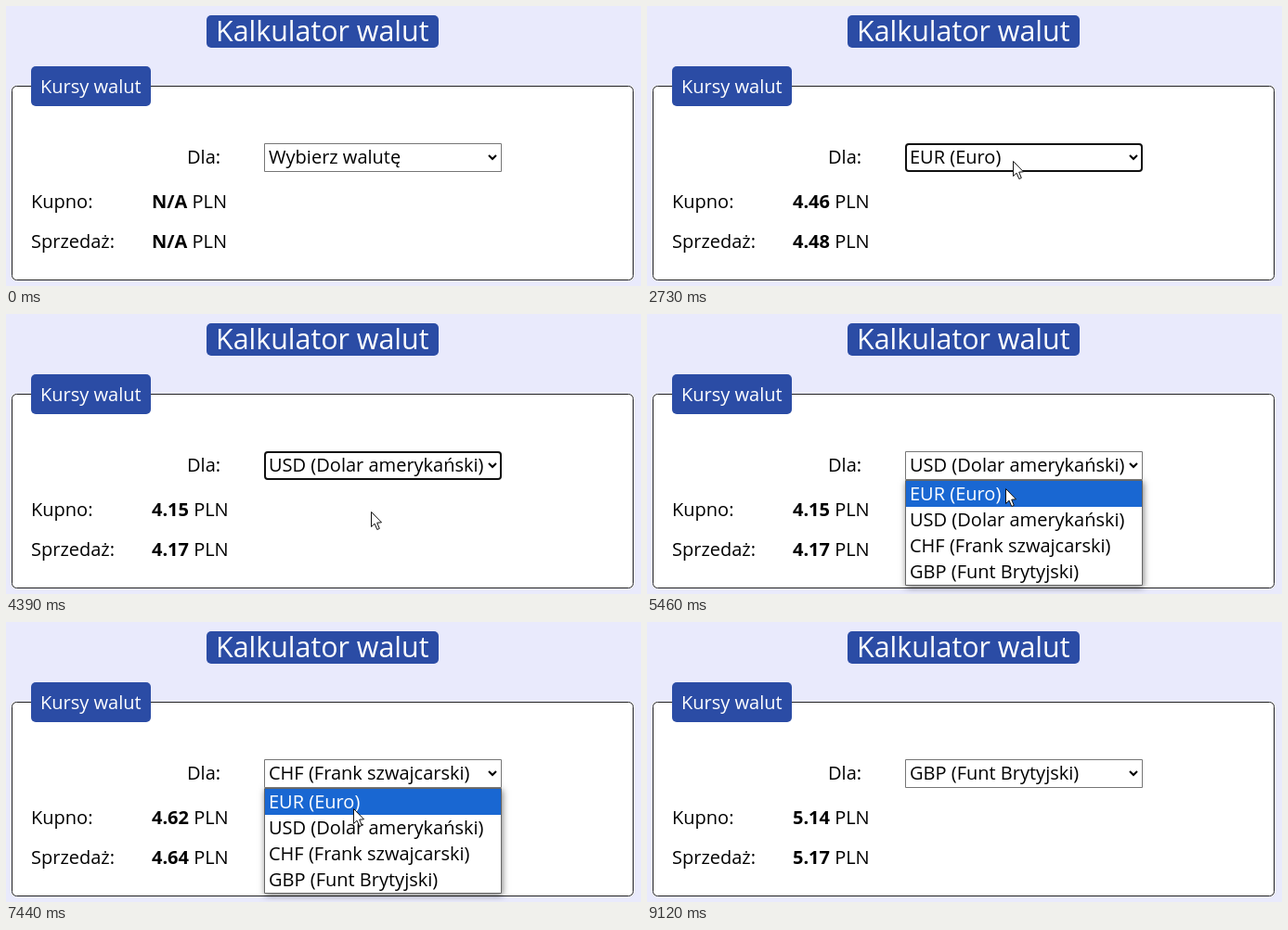
An HTML page with a canvas for the animation above (9.18 s loop, 684 px wide and 302 px high).

```html
<!DOCTYPE html>
<html lang="pl">
<head>
<meta charset="utf-8">
<title>Kalkulator walut</title>
<style>
  html, body { margin: 0; width: 100%; height: 100%; overflow: hidden; background: #e9eafc; }
  canvas { display: block; width: 684px; height: 302px; }
</style>
</head>
<body>
<canvas id="stage" width="684" height="302"></canvas>
<script>
const ctx = document.getElementById('stage').getContext('2d');
const LOOP = 9180;
const FAMILY = '"Open Sans", "Noto Sans", sans-serif';
const BLUE = '#2b4ca5';

const options = [
  { label: 'EUR (Euro)', buy: '4.46', sell: '4.48' },
  { label: 'USD (Dolar amerykański)', buy: '4.15', sell: '4.17' },
  { label: 'CHF (Frank szwajcarski)', buy: '4.62', sell: '4.64' },
  { label: 'GBP (Funt Brytyjski)', buy: '5.14', sell: '5.17' }
];
const placeholder = { label: 'Wybierz walutę', buy: 'N/A', sell: 'N/A' };

// Each round: the list opens on a click, then a second click picks the option.
const rounds = [
  { open: 930, openEnd: 1000, pick: 2000, close: 2060 },
  { open: 3060, openEnd: 3120, pick: 4130, close: 4190 },
  { open: 5120, openEnd: 5250, pick: 6190, close: 6250 },
  { open: 7110, openEnd: 7180, pick: 8240, close: 8450 }
];

const cubic = p => p < 0.5 ? 4 * p ** 3 : 1 - 4 * (1 - p) ** 3;
const smooth = p => p * p * (3 - 2 * p);
const easeOut = p => 1 - (1 - p) ** 1.6;
const easeIn = p => p ** 1.5;

// The pointer moves in discrete steps, as in a screen recording.
const entry = [455, 264];
const moves = [
  { from: 190, to: 720, steps: 9, end: [406, 158], ease: easeOut },
  { from: 1200, to: 1460, steps: 5, end: [398, 190], ease: smooth },
  { from: 2590, to: 2730, steps: 3, end: [394, 167], ease: smooth },
  { from: 3260, to: 3530, steps: 5, end: [393, 214], ease: smooth },
  { from: 4390, to: 4720, steps: 6, end: [387, 168], ease: cubic },
  { from: 5390, to: 5720, steps: 6, end: [385, 244], ease: smooth },
  { from: 6450, to: 6850, steps: 6, end: [370, 166], ease: smooth },
  { from: 7380, to: 7910, steps: 9, end: [382, 273], ease: easeOut },
  { from: 8590, to: 8720, steps: 3, end: [582, 287], ease: easeIn }
];
const POINTER_ON = 190, POINTER_OFF = 8790, BLUR_AT = 9120;

function pointerAt(t) {
  let pos = entry;
  for (const m of moves) {
    if (t < m.from) break;
    const pace = (m.to - m.from) / (m.steps - 1);
    const step = Math.min(m.steps, Math.floor((t - m.from) / pace + 0.08) + 1);
    const k = m.ease(step / m.steps);
    pos = pos.map((v, i) => Math.round(v + (m.end[i] - v) * k));
  }
  return pos;
}

function stateAt(t) {
  const s = { chosen: -1, open: false, click: false, focus: false };
  rounds.forEach((r, i) => {
    if (t >= r.close) s.chosen = i;
    if (t >= r.open && t < r.close) s.open = true;
    if ((t >= r.open && t < r.openEnd) || (t >= r.pick && t < r.close)) s.click = true;
  });
  s.focus = s.chosen >= 0 && !s.open && t < BLUR_AT;
  return s;
}

function text(str, x, y, color = '#000', size = 20, weight = 400) {
  ctx.font = `${weight} ${size}px ${FAMILY}`;
  ctx.fillStyle = color;
  ctx.fillText(str, x, y);
  return ctx.measureText(str).width;
}

function rounded(x, y, w, h, r) {
  ctx.beginPath();
  ctx.roundRect(x, y, w, h, r);
}

function badge(str, x, y, w, h, tx, ty, size) {
  ctx.fillStyle = BLUE;
  rounded(x, y, w, h, 5);
  ctx.fill();
  text(str, tx, ty, '#fff', size);
}

function outline(x, y, w, h, r, width, color) {
  rounded(x + width / 2, y + width / 2, w - width, h - width, r);
  ctx.lineWidth = width;
  ctx.strokeStyle = color;
  ctx.stroke();
}

function rate(label, value, y) {
  text(label, 27, y);
  const w = text(value, 157, y, '#000', 20, 700);
  text(' PLN', 157 + w, y);
}

function drawPage(rates) {
  ctx.fillStyle = '#e9eafc';
  ctx.fillRect(0, 0, 684, 302);
  badge('Kalkulator walut', 216, 10, 250, 35, 226, 38, 30.4);
  ctx.fillStyle = '#fff';
  rounded(6, 86, 670, 210, 5);
  ctx.fill();
  outline(6, 86, 670, 210, 5, 1, '#222');
  badge('Kursy walut', 27, 65, 129, 43, 37, 94, 20);
  text('Dla:', 195, 170);
  rate('Kupno:', rates.buy, 218);
  rate('Sprzedaż:', rates.sell, 261);
}

function drawList(active) {
  ctx.save();
  ctx.shadowColor = 'rgba(0,0,0,0.5)';
  ctx.shadowBlur = 7;
  ctx.shadowOffsetX = 1;
  ctx.shadowOffsetY = 2;
  ctx.fillStyle = '#fff';
  ctx.fillRect(278, 179, 256, 114);
  ctx.restore();
  outline(278, 179, 256, 114, 0, 1, '#666');
  options.forEach((o, i) => {
    const y = 180 + i * 28;
    if (i === active) {
      ctx.fillStyle = '#1967d2';
      ctx.fillRect(279, y, 254, 28);
    }
    text(o.label, 283, y + 21, i === active ? '#fff' : '#000');
  });
}

function drawSelect(label, focus) {
  ctx.fillStyle = '#fff';
  rounded(278, 148, 256, 31, focus ? 3 : 0);
  ctx.fill();
  if (focus) outline(278, 148, 256, 31, 3, 2, '#101010');
  else outline(278, 148, 256, 31, 0, 1, '#767676');
  text(label, 283, 170);
  ctx.beginPath();
  ctx.moveTo(520, 161);
  ctx.lineTo(524, 165);
  ctx.lineTo(528, 161);
  ctx.lineWidth = 2;
  ctx.strokeStyle = '#000';
  ctx.stroke();
}

function drawPointer([x, y], click) {
  if (click) {
    ctx.fillStyle = 'rgba(252,222,40,0.72)';
    ctx.beginPath();
    ctx.arc(x, y, 12, 0, Math.PI * 2);
    ctx.fill();
  }
  ctx.save();
  ctx.translate(x + 0.5, y + 0.5);
  ctx.beginPath();
  ctx.moveTo(0, 0);
  ctx.lineTo(0, 16);
  ctx.lineTo(3.6, 12.7);
  ctx.lineTo(6.3, 19);
  ctx.lineTo(8.8, 17.9);
  ctx.lineTo(6.2, 11.7);
  ctx.lineTo(11, 11.3);
  ctx.closePath();
  ctx.fillStyle = '#fff';
  ctx.fill();
  ctx.lineWidth = 1;
  ctx.strokeStyle = '#111';
  ctx.stroke();
  ctx.restore();
}

function draw(t) {
  const s = stateAt(t);
  const pos = pointerAt(t);
  const current = options[s.chosen] || placeholder;
  drawPage(current);
  if (s.open) drawList(pos[1] >= 180 ? Math.floor((pos[1] - 180) / 28) : s.chosen);
  drawSelect(current.label, s.focus);
  if (t >= POINTER_ON && t < POINTER_OFF) drawPointer(pos, s.click);
}

const start = performance.now();
function tick() {
  draw((performance.now() - start) % LOOP);
  requestAnimationFrame(tick);
}
tick();
</script>
</body>
</html>
```
